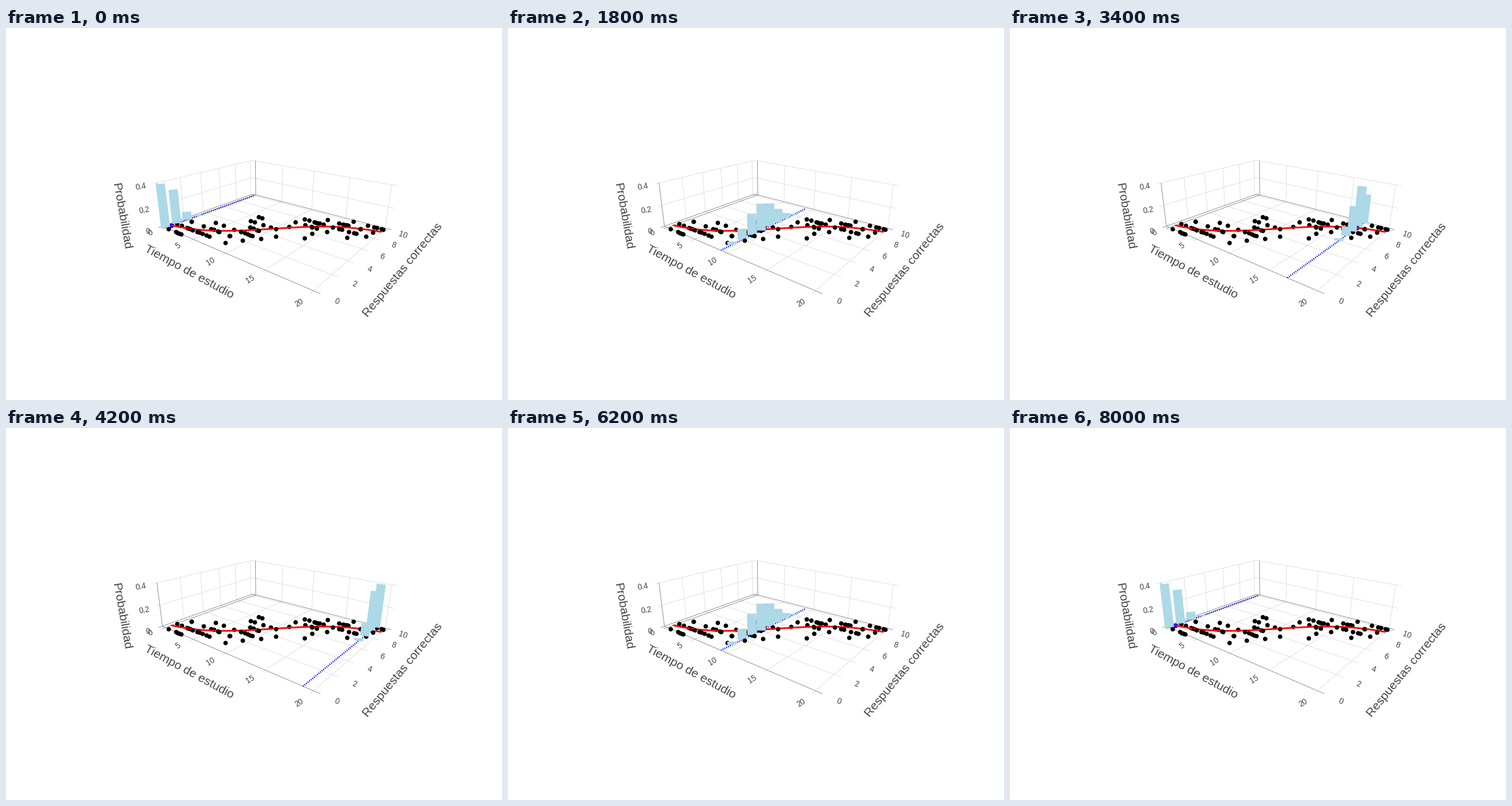
These frames come from a looping animation (864 px wide and 648 px high, 8200 ms). A matplotlib script:

```python
from math import comb

import matplotlib.pyplot as plt
import numpy as np
from matplotlib.animation import FuncAnimation

W, H = 864, 648
N = 10           # questions per test
T_MAX = 20       # study time range
Z_MAX = 0.4      # bars are cut at the top of the box
STEPS = 2 * T_MAX + 1

# Perspective camera: rows give u*w, v*w and w for (x, y, z, 1)
CAMERA = np.array([
    [4.525, 28.5, -57.75, 278.0],
    [-1.63, 3.37, -224.5, 347.5],
    [-0.0156, 0.0305, -0.128, 1.0],
])

# Study times of the students, grouped by correct answers
TIMES = {
    0: [0.56, 1.97, 2.29, 2.60, 2.91],
    1: [0.06, 0.95, 1.92, 2.23, 2.55, 2.96, 3.77, 4.17, 4.66, 5.33, 5.80, 8.32],
    2: [0.78, 0.86, 3.03, 4.34, 4.83, 5.50, 5.73, 7.36, 7.46, 9.29],
    3: [3.41, 4.81, 6.51, 7.61, 8.23, 8.66, 9.00, 9.30, 10.54],
    4: [7.60, 8.14, 8.67, 8.93, 11.41],
    5: [6.31, 6.96, 8.32, 9.45, 10.18, 14.15],
    6: [6.28, 6.80, 10.98, 14.14],
    7: [10.82, 12.19, 13.07, 13.21, 13.81, 15.16, 17.64],
    8: [11.15, 11.86, 12.56, 12.80, 13.08, 13.32, 13.83, 15.06,
        15.91, 16.21, 17.13, 17.70, 18.04, 19.15],
    9: [13.51, 15.08, 15.61, 15.84, 16.06, 16.32, 17.78, 17.90, 19.32],
    10: [16.26, 18.06, 18.84, 19.15, 19.72, 19.93],
}


def project(x, y, z=0.0):
    x, y, z = np.broadcast_arrays(*(np.asarray(a, float) for a in (x, y, z)))
    u, v, w = np.tensordot(CAMERA, np.stack([x, y, z, np.ones_like(x)]), 1)
    return u / w, v / w


def depth_order(x, y, bias=0.0):
    """Nearer things get a higher zorder."""
    return 10 - (CAMERA[2] @ [x, y, 0, 1] - bias)


def success(x):
    return 1 / (1 + np.exp(2.9 - 0.288 * x))


def binomial(k, p):
    return comb(N, k) * p**k * (1 - p)**(N - k)


plt.rcParams["font.family"] = "Liberation Sans"
fig = plt.figure(figsize=(W / 72, H / 72), dpi=72, facecolor="white")
ax = fig.add_axes([0, 0, 1, 1])
ax.set_xlim(0, W)
ax.set_ylim(H, 0)
ax.axis("off")


def segment(a, b, zero=False):
    u, v = project(*zip(a, b))
    ax.plot(u, v, color="#858585" if zero else "#dddddd", lw=0.9,
            zorder=2 if zero else 1)


def draw_box():
    x0, x1 = -T_MAX / 32, T_MAX * 33 / 32
    y0, y1 = -N / 32, N * 33 / 32
    for x in range(0, 21, 5):
        segment((x, y0, 0), (x, y1, 0), x == 0)
        segment((x, y1, 0), (x, y1, Z_MAX), x == 0)
    for y in range(0, 11, 2):
        segment((x0, y, 0), (x1, y, 0), y == 0)
        segment((x0, y, 0), (x0, y, Z_MAX), y == 0)
    for z in (0, 0.2, 0.4):
        segment((x0, y0, z), (x0, y1, z), z == 0)
        segment((x0, y1, z), (x1, y1, z), z == 0)


def label(u, v, text, angle, size=13.5):
    ax.text(u, v, text, rotation=angle, fontsize=size, color="#444444",
            ha="center", va="center")


def draw_labels():
    label(201, 328, "Probabilidad", -80, 21.2)
    label(319, 425.5, "Tiempo de estudio", -28.5, 21.2)
    label(691, 422, "Respuestas correctas", 50.5, 21.2)
    ticks = [
        (10, ("0", "0.2", "0.4"), [(247, 354), (241, 317), (235, 276)]),
        (31, ("0", "5", "10", "15", "20"),
         [(252, 357), (300, 380), (356, 407), (425, 438), (511, 479)]),
        (-18, ("0", "2", "4", "6", "8", "10"),
         [(576, 476), (607, 446), (633, 420), (655, 398), (675, 378), (691, 361)]),
    ]
    for angle, names, spots in ticks:
        for name, (u, v) in zip(names, spots):
            label(u, v, name, angle)


def draw_data():
    for y, times in TIMES.items():
        for x in times:
            u, v = project(x, y)
            ax.plot([u], [v], "o", color="black", ms=7.8, mew=0,
                    zorder=depth_order(x, y))
    xs = np.linspace(0, T_MAX, 81)
    for a, b in zip(xs[:-1], xs[1:]):
        ends = np.array([a, b])
        mid = (a + b) / 2
        ax.plot(*project(ends, N * success(ends)), color="red", lw=2.8,
                solid_capstyle="round",
                zorder=depth_order(mid, N * success(mid), 0.001))


draw_box()
draw_labels()
draw_data()

guide, = ax.plot([], [], color="blue", lw=2.7, ls=(0, (0.55, 0.75)),
                 dash_capstyle="butt", zorder=3)
mean_dot, = ax.plot([], [], "o", color="blue", ms=8.2, mew=0)
bars = [ax.plot([], [], color="lightblue", lw=16, solid_capstyle="butt")[0]
        for _ in range(N + 1)]


def update(i):
    x = T_MAX - abs(T_MAX - i)
    p = success(x)
    guide.set_data(*project([x, x], [0, N]))
    u, v = project(x, N * p)
    mean_dot.set_data([u], [v])
    mean_dot.set_zorder(depth_order(x, N * p))
    for k, bar in enumerate(bars):
        top = min(binomial(k, p), Z_MAX)
        bar.set_data(*project([x, x], [k, k], [0, top]))
        bar.set_zorder(depth_order(x, k, 0.0025))
    return [guide, mean_dot, *bars]


anim = FuncAnimation(fig, update, frames=STEPS, interval=200,
                     repeat=True, repeat_delay=0, blit=False)
plt.show()
```
